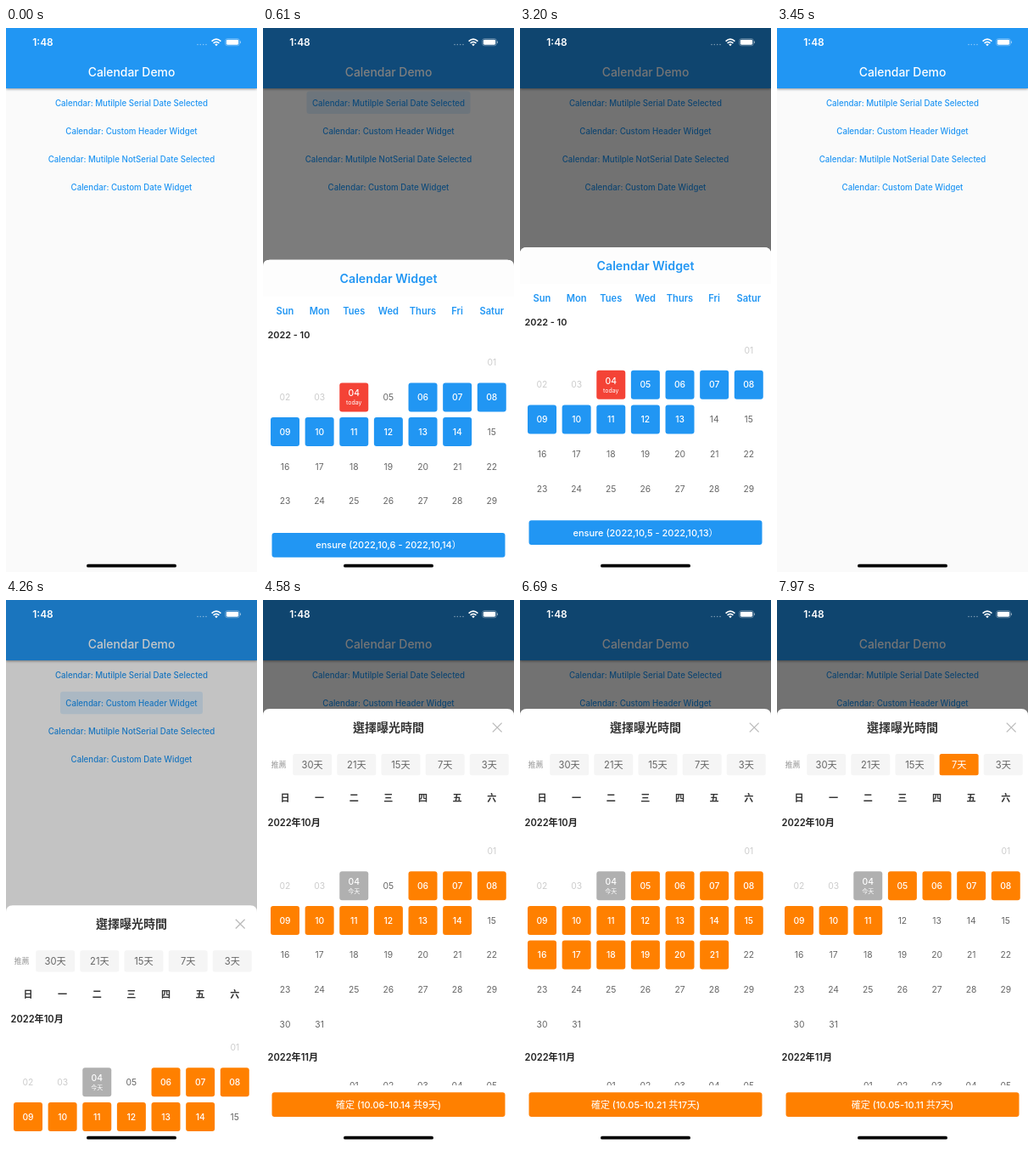
These frames come from a looping animation (296x640 px, 8 s). An HTML page:

```html
<!DOCTYPE html>
<html lang="zh-Hant">
<head>
<meta charset="utf-8">
<style>
html, body { margin: 0; width: 100%; height: 100%; overflow: hidden; background: #fafafa }
svg { display: block; width: 296px; height: 640px }
text { font-family: Inter, "Noto Sans CJK TC", "Noto Sans CJK JP", "Noto Sans CJK", sans-serif; white-space: pre }
</style>
</head>
<body>
<svg id="stage" viewBox="0 0 296 640"></svg>
<script>
const LOOP = 8000, BLUE = '#2196f3', ORANGE = '#ff8000';
// The screen refreshes only at these moments.
const TICKS = [0, 500, 610, 730, 840, 1460, 1580, 2110, 2210, 2320, 3200, 3330, 3450,
  4150, 4260, 4370, 4470, 4580, 5760, 5870, 6590, 6690, 7450, 7570, 7970];

const clamp = v => Math.max(0, Math.min(1, v));
const pad = n => String(n).padStart(2, '0');
const rect = (x, y, w, h, fill, r = 0, extra = '') =>
  `<rect x="${x}" y="${y}" width="${w}" height="${h}" rx="${r}" fill="${fill}" ${extra}/>`;
// y is the middle of the capitals
const text = (x, y, str, size, weight, fill, anchor = 'middle') =>
  `<text x="${x}" y="${y + size * 0.364}" font-size="${size}" font-weight="${weight}" fill="${fill}" text-anchor="${anchor}">${str}</text>`;

// cubic-bezier(0, 0, .2, 1)
function decelerate(x) {
  let lo = 0, hi = 1;
  for (let i = 0; i < 20; i++) {
    const s = (lo + hi) / 2;
    if (0.6 * s * s + 0.4 * s ** 3 < x) lo = s; else hi = s;
  }
  return 3 * lo * lo - 2 * lo ** 3;
}

const colX = col => 26 + 40.63 * col;

const MENU = ['Mutilple Serial Date Selected', 'Custom Header Widget',
  'Mutilple NotSerial Date Selected', 'Custom Date Widget'];

function home(inkRow, ink) {
  const inkBox = ink ? rect(inkRow ? 64 : 51.5, 74.5 + 33.3 * inkRow, inkRow ? 168 : 193, 26.5, BLUE, 3, `opacity="${ink}"`) : '';
  return rect(0, 0, 296, 640, '#fafafa') + inkBox +
    MENU.map((label, i) => text(148, 88 + 33.2 * i, 'Calendar: ' + label, 9.7, 500, BLUE)).join('') +
    rect(0, 0, 296, 71, BLUE, 0, 'style="filter:drop-shadow(0 1.5px 1.5px #0006)"') +
    text(148, 52, 'Calendar Demo', 13.9, 500, '#fff');
}

function statusBar() {
  const dots = [226, 229.3, 232.7, 236].map(x => `<circle cx="${x}" cy="19.5" r=".8" fill="#fff" opacity=".45"/>`).join('');
  const wifi = `<g fill="none" stroke="#fff" stroke-width="1.7"><path d="M242.6 15.6Q248 10.8 253.4 15.6M244.6 17.8Q248 14.9 251.4 17.8"/></g>
    <path d="M246.2 19.3Q248 17.9 249.8 19.3L248 21.2Z" fill="#fff"/>`;
  const battery = rect(258.7, 12.6, 16.6, 8.2, 'none', 2.4, 'stroke="#fff" stroke-opacity=".45" stroke-width=".7"') +
    rect(259.8, 13.7, 14.4, 6, '#fff', 1.4) + rect(276, 15.3, 1, 2.8, '#fff', 0.5, 'opacity=".5"');
  return text(43.5, 17, '1:48', 11.9, 600, '#fff') + dots + wifi + battery;
}

// October 2022: the 1st falls on a Saturday and the 4th is today
function october(top, lastDay, from, to, accent, todayFill, todayLabel) {
  let out = '';
  for (let d = 1; d <= lastDay; d++) {
    const x = colX((d + 5) % 7), y = top + 40.7 * Math.floor((d + 5) / 7);
    const today = d === 4, picked = d >= from && d <= to;
    if (today || picked) out += rect(x - 17, y - 17, 34, 34, today ? todayFill : accent, 3);
    out += text(x, today ? y - 4.7 : y, pad(d), 10.3, today || picked ? 500 : 400,
      today || picked ? '#fff' : d < 4 ? '#ccc' : '#666');
    if (today) out += text(x, y + 6.4, todayLabel, 7, 400, '#fff');
  }
  return out;
}

const weekdays = (names, y, fill) =>
  names.map((name, i) => text(colX(i), y, name, 11.1, 600, fill)).join('');

const footer = (label, accent) => rect(0, 571, 296, 69, '#fff') +
  rect(10.5, 579.3, 275, 28.8, accent, 3) + text(148, 593.7, label, 11, 500, '#fff');

const panel = top => `<path d="M0 640V${top + 8}q0-8 8-8H288q8 0 8 8V640V1200H0Z" fill="#fff"/>`;

function serialSheet(from, to) {
  const end = from === to ? '' : ` - 2022,10,${to}`;
  return panel(258) +
    '<path d="M0 301V266q0-8 8-8H288q8 0 8 8V301Z" fill="#fdfdfd"/>' +
    text(148, 279.7, 'Calendar Widget', 14.2, 600, BLUE) +
    weekdays(['Sun', 'Mon', 'Tues', 'Wed', 'Thurs', 'Fri', 'Satur'], 318, BLUE) +
    text(5.5, 346.5, '2022 - 10', 10.9, 600, '#222', 'start') +
    october(379, 29, from, to, BLUE, '#f44336', 'today') +
    footer(`ensure (2022,10,${from}${end}）`, BLUE);
}

function exposureSheet(from, to, preset) {
  const chips = [30, 21, 15, 7, 3].map((n, i) => {
    const x = 35.2 + 52.15 * i, on = n === preset;
    return rect(x, 181, 46, 25.3, on ? ORANGE : '#f5f5f5', 2.5) +
      text(x + 23, 193.7, n + '天', 11.2, 400, on ? '#fff' : '#666');
  }).join('');
  const nextMonth = [1, 2, 3, 4, 5].map(d => text(colX(d + 1), 571.5, pad(d), 10.3, 400, '#666')).join('');
  const end = from === to ? '' : '-10.' + pad(to);
  return panel(128) +
    text(148, 150, '選擇曝光時間', 14, 600, '#333') +
    '<path d="M270.8 144.6l10.8 10.8m0-10.8l-10.8 10.8" stroke="#bbb" stroke-width="1.3"/>' +
    text(9.5, 194, '推薦', 9.1, 400, '#999', 'start') + chips +
    weekdays([...'日一二三四五六'], 232.5, '#333') +
    text(5.5, 262, '2022年10月', 11.1, 600, '#222', 'start') +
    october(295.5, 31, from, to, ORANGE, '#b0b0b0', '今天') +
    text(5.5, 538, '2022年11月', 11.1, 600, '#222', 'start') + nextMonth +
    footer(`確定 (10.${pad(from)}${end} 共${to - from + 1}天)`, ORANGE);
}

function scene(t) {
  const second = t >= 4150;
  const progress = clamp(second ? (t - 4207) / 230 : t < 3200 ? (t - 439.5) / 230 : t < 3300 ? 1 : 1 - (t - 3190) / 200);
  const since = t - (second ? 4150 : 500), inkTime = second ? 430 : 340;
  const ink = since >= 0 && since < inkTime ? 0.14 * clamp(2 - 2 * since / inkTime) : 0;
  let sheet = '';
  if (progress > 0) {
    const height = second ? 512 : 382;
    const dim = 0.54 * (1 - (1 - progress) ** 2);
    const body = second
      ? t < 5760 ? exposureSheet(6, 14) : t < 6590 ? exposureSheet(5, 5) : t < 7450 ? exposureSheet(5, 21)
        : t < 7970 ? exposureSheet(5, 7, 3) : exposureSheet(5, 11, 7)
      : t < 1460 ? serialSheet(6, 14) : t < 2110 ? serialSheet(5, 5) : serialSheet(5, 13);
    sheet = rect(0, 0, 296, 640, '#000', 0, `opacity="${dim}"`) +
      `<g transform="translate(0 ${height * (1 - decelerate(progress))})">${body}</g>`;
  }
  return home(second ? 1 : 0, ink) + sheet + statusBar() + rect(95, 630.8, 106, 3.8, '#000', 1.9);
}

const stage = document.getElementById('stage');
let shown = -1;
function frame() {
  const now = performance.now() % LOOP;
  const tick = TICKS.findLast(t => t <= now);
  if (tick !== shown) stage.innerHTML = scene(shown = tick);
  requestAnimationFrame(frame);
}
frame();
</script>
</body>
</html>
```
